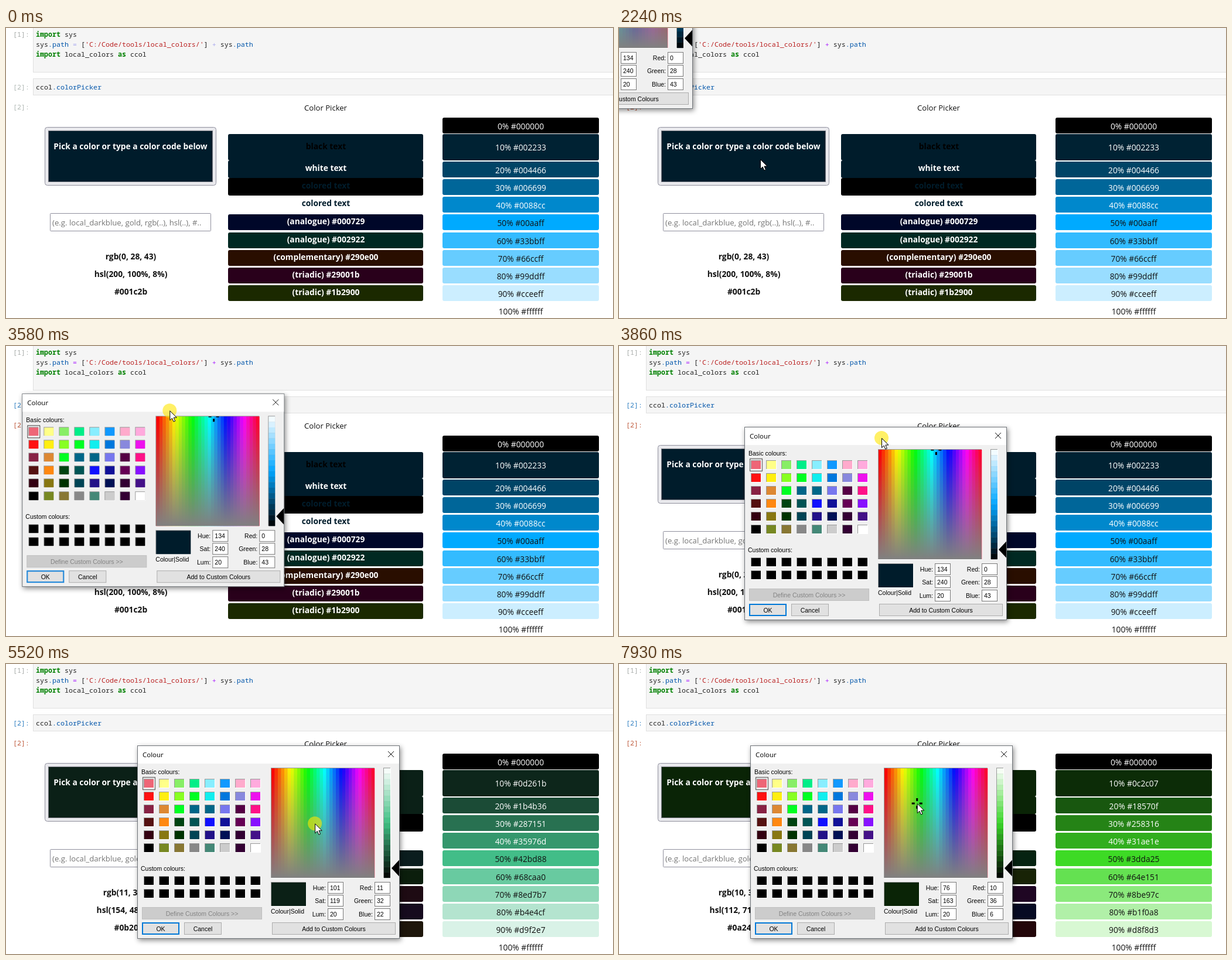
An HTML page that plays this animation: 1036x495 px, repeating every 8 s.

```html
<!DOCTYPE html>
<html lang="en">
<head>
<meta charset="utf-8">
<title>Color Picker</title>
<style>
  html, body { margin: 0; width: 100%; height: 100%; overflow: hidden; background: #fff; }
  svg { display: block; width: 100%; height: 100%; }
  text { white-space: pre; font: 13.8px "Open Sans", "Noto Sans", sans-serif; fill: #111; }
  .mid { text-anchor: middle; }
  .bold { font-weight: 700; }
  .code { font: 11.67px "Noto Sans Mono", "DejaVu Sans Mono", monospace; fill: #212121; }
  .kw { font-weight: 700; fill: #008000; }
  .prop { fill: #0055aa; }
  .str { fill: #ba2121; }
  .ui { font: 10.5px "Liberation Sans", Arial, sans-serif; fill: #000; }
  .end { text-anchor: end; }
  .white { fill: #fff; }
  #dialog { filter: drop-shadow(2px 3px 4px rgba(0, 0, 0, .45)); }
</style>
</head>
<body>
<svg id="stage" viewBox="0 0 1036 495"></svg>
<script>
const LOOP = 8000, STEP = 200 / 3;
const PRESS = 1790, PICK = 4800, RELEASE = 7930;
const $ = id => document.getElementById(id);

// ---- colour maths ----
const hex = rgb => '#' + rgb.map(v => v.toString(16).padStart(2, '0')).join('');

function hslHex(h, s, l) {
  s /= 100; l /= 100;
  const a = s * Math.min(l, 1 - l);
  return hex([0, 8, 4].map(n => {
    const k = (n + h / 30 + 12) % 12;
    return Math.round(255 * (l - a * Math.max(-1, Math.min(k - 3, 9 - k, 1))));
  }));
}

function toHsl([r, g, b]) {
  const max = Math.max(r, g, b), min = Math.min(r, g, b), d = max - min, sum = max + min;
  let h = 0;
  if (d) h = max === r ? (g - b) / d : max === g ? 2 + (b - r) / d : 4 + (r - g) / d;
  const s = d ? d / (sum > 255 ? 510 - sum : sum) : 0;
  return [(h * 60 + 360) % 360, s * 100, sum / 5.1].map(v => Math.floor(v + 1e-9));
}

// Integer hue/sat/lum on a 0..240 scale, as the system dialog computes it.
function dialogRgb(h, s, l) {
  const hi = l <= 120 ? Math.floor((l * (240 + s) + 120) / 240)
                      : l + s - Math.floor((l * s + 120) / 240);
  const lo = 2 * l - hi;
  return [80, 0, -80].map(o => {
    const k = (h + o + 240) % 240;
    const ramp = n => lo + Math.floor(((hi - lo) * n + 20) / 40);
    const v = k < 40 ? ramp(k) : k < 120 ? hi : k < 160 ? ramp(160 - k) : lo;
    return Math.max(0, Math.min(255, Math.floor((v * 255 + 120) / 240)));
  });
}

// ---- markup helpers ----
const rect = (x, y, w, h, fill, more = '') =>
  `<rect x="${x}" y="${y}" width="${w}" height="${h}" fill="${fill}" ${more}/>`;
const box = (x, y, w, h, fill, line, more = '') =>
  rect(x + .5, y + .5, w - 1, h - 1, fill, `stroke="${line}" ${more}`);
const text = (x, y, s, cls = '', more = '') =>
  `<text x="${x}" y="${y}" class="${cls}" ${more}>${s}</text>`;
const code = (y, ...parts) => text(51, y, parts.map(([s, c = '']) =>
  `<tspan class="${c}">${s}</tspan>`).join(''), 'code');
const list = (n, fn) => Array.from({ length: n }, (_, i) => fn(i)).join('');

// ---- notebook page ----
const rowY = i => i < 2 ? 153 + i * 28 : Math.round(228 + (i - 2) * 30.15);
const SCHEMES = [['analogue', 30], ['analogue', -30], ['complementary', 180], ['triadic', 120], ['triadic', -120]];

function page() {
  const round = 'rx="3"';
  return box(46, -10, 1000, 86, '#f5f5f5', '#e0e0e0') + box(46, 86, 1000, 29, '#f5f5f5', '#e0e0e0')
    + text(12, 15, '[1]:', 'code', 'style="fill:#a6aaa8"')
    + text(12, 105, '[2]:', 'code', 'id="inMark"') + text(12, 139, '[2]:', 'code', 'id="outMark"')
    + code(15, ['import', 'kw'], [' sys'])
    + code(32, ['sys'], ['.path', 'prop'], [' = ', 'op'], ['['], ["'C:/Code/tools/local_colors/'", 'str'],
        [']'], [' + ', 'op'], ['sys'], ['.path', 'prop'])
    + code(49, ['import', 'kw'], [' local_colors '], ['as', 'kw'], [' ccol'])
    + code(105, ['ccol'], ['.colorPicker', 'prop'])
    + text(545.5, 141, 'Color Picker', 'mid', 'style="font-size:13.1px"')
    + box(66, 169, 293, 100, '#e9e9ed', '#8f8f9d', 'rx="4" id="button"')
    + box(72, 175, 281, 88, '#000', '#777780', 'class="fill"')
    + text(212.5, 207, 'Pick a color or type a color code below', 'mid bold white')
    + box(75, 316, 275, 31, '#fff', '#8f8f9d', 'rx="1"')
    + text(79, 337, '(e.g. local_darkblue, gold, rgb(..), hsl(..), #..', '', 'style="font-size:13.2px;fill:#757575"')
    + ['rgb', 'hsl', 'hex'].map((id, i) => text(213, 395 + i * 30, '', 'mid bold', `id="${id}"`)).join('')
    + rect(379, 181, 333, 45, '', round + ' class="fill"') + rect(379, 226, 333, 30, '', round + ' class="fill"')
    + rect(379, 256, 333, 30, '#000', round)
    + text(546, 207, 'black text', 'mid bold', 'style="fill:#000"') + text(546, 244, 'white text', 'mid bold white')
    + text(546, 274, 'colored text', 'mid bold', 'data-ink') + text(546, 304, 'colored text', 'mid bold', 'data-ink')
    + list(5, i => rect(379, rowY(i + 5), 333, 27, '', `${round} id="scheme${i}"`)
        + text(546, rowY(i + 5) + 16.6, '', 'mid bold white', `id="schemeText${i}"`))
    + list(11, i => rect(745, rowY(i), 267, i === 1 ? 45 : 27, '', `${round} id="tone${i}"`)
        + text(878.5, rowY(i) + (i === 1 ? 28 : 20.3), '', i < 5 ? 'mid white' : 'mid', `id="toneText${i}"`));
}

// ---- colour dialog, drawn from its own top left corner ----
const BASIC = ('e67 ff8 8e6 0e8 8ef 19f fac fad f11 fe1 8f2 0f2 1ee 07d 88d e1e '
  + '824 d83 0f2 068 068 77e 504 f18 511 f81 041 055 11f 119 605 81f '
  + '301 871 030 045 218 015 303 418 000 782 873 888 487 ccc 303 fff').split(' ');
const FIELD = { x: 229, y: 39, w: 176, h: 187 };
const BANDS = 32, TONES = 20;
const fieldX = hue => FIELD.x + hue / 240 * FIELD.w;
const fieldY = sat => FIELD.y + (1 - sat / 240) * FIELD.h;

const sunken = (x, y, w, h, inner) => rect(x - 1, y - 1, w + 2, h + 2, '#fff')
  + rect(x - 1, y - 1, w + 1, h + 1, '#999') + inner;
const swatch = (i, y, c) => {
  const x = 12 + i % 8 * 26, top = y + Math.floor(i / 8) * 22;
  return sunken(x, top, 16, 14, rect(x, top, 16, 14, c));
};
const button = (x, y, w, label, fill = '#e1e1e1', line = '#adadad', ink = '#000') =>
  box(x, y, w, 21, fill, line) + text(x + w / 2, y + 14.5, label, 'ui mid', `style="fill:${ink}"`);
const entry = (x, y, label, id) => text(x - 3, y + 14, label + ':', 'ui end')
  + box(x, y, 27, 20, '#fff', '#7a7a7a') + text(x + 4, y + 14, '', 'ui', `id="${id}"`);

function dialog() {
  const { x, y, w, h } = FIELD, bw = w / BANDS, th = h / TONES;
  return `<defs>
      <linearGradient id="grey" x2="0" y2="1"><stop stop-color="#808080" stop-opacity="0"/>
        <stop offset="1" stop-color="#808080"/></linearGradient>
      <clipPath id="inField">${rect(x, y, w, h, '#000')}</clipPath></defs>`
    + box(0, 0, 448, 330, '#f0f0f0', '#70757a') + rect(1, 1, 446, 30, '#fff')
    + text(9, 20, 'Colour', '', 'style="font-size:11.5px;fill:#000"')
    + '<path d="M428 10l10 10m0-10l-10 10" stroke="#111" fill="none"/>'
    + text(7, 49, 'Basic colours:', 'ui') + text(6, 214, 'Custom colours:', 'ui')
    + BASIC.map((c, i) => swatch(i, 58, '#' + c)).join('')
    + box(9, 54, 22, 22, 'none', '#000', 'stroke-dasharray="1 1" stroke-width="1.4"')
    + list(16, i => swatch(i, 224, '#000'))
    + button(8, 276, 205, 'Define Custom Colours >>', '#ccc', '#bfbfbf', '#838383')
    + button(8, 302, 64, 'OK', '#e1e1e1', '#0078d7') + rect(9.5, 303.5, 61, 18, 'none', 'stroke="#0078d7"')
    + button(80, 302, 64, 'Cancel') + button(230, 302, 211, 'Add to Custom Colours')
    + sunken(x, y, w, h, list(BANDS, i =>
        rect(x + i * bw, y, bw + .3, h, `hsl(${i / BANDS * 360} 100% 50%)`)))
    + rect(x, y, w, h, 'url(#grey)')
    + '<g clip-path="url(#inField)"><path id="mark" d="M-9 0h5m8 0h5M0-9v5m0 8v5" stroke="#000" stroke-width="3"/></g>'
    + sunken(421, y, 11, h, list(TONES, i => rect(421, y + i * th, 11, th + .2, '', `id="lum${i}"`)))
    + '<path d="M434 209.5l13-14v28z"/>'
    + sunken(229, 234, 59, 40, rect(229, 234, 59, 40, '', 'id="sample"'))
    + text(228, 287, 'Colour|Solid', 'ui')
    + ['Hue', 'Sat', 'Lum'].map((s, i) => entry(325, Math.round(233 + i * 22.4), s, s)).join('')
    + ['Red', 'Green', 'Blue'].map((s, i) => entry(405, Math.round(233 + i * 22.4), s, s)).join('');
}

$('stage').innerHTML = page() + `<g id="dialog">${dialog()}</g>
  <g id="cursor"><circle id="halo" r="12" fill="#ffe600" opacity=".6"/>
  <path id="arrow" d="M.5 .5V16.5L4.2 13L6.8 19L9.4 17.9L6.9 12H12Z" fill="#fff" stroke="#000"/>
  <path id="beam" d="M-3-8h2.5l.5 .5l.5-.5H3M0-8V8M-3 8h6" fill="none" stroke="#000"/></g>`;

// ---- motion: smooth curves through [time, x, y] ----
function along(keys, t) {
  const last = keys.length - 1;
  if (t <= keys[0][0]) return keys[0].slice(1);
  if (t >= keys[last][0]) return keys[last].slice(1);
  const i = keys.findIndex(k => k[0] > t) - 1, a = keys[i], b = keys[i + 1];
  const span = b[0] - a[0], u = (t - a[0]) / span;
  const slope = (j, c) => j === 0 || j === last ? 0
    : (keys[j + 1][c] - keys[j - 1][c]) / (keys[j + 1][0] - keys[j - 1][0]);
  return [1, 2].map(c => a[c] + (b[c] - a[c]) * u * u * (3 - 2 * u)
    + span * u * (1 - u) * (slope(i, c) * (1 - u) - slope(i + 1, c) * u));
}

const APPROACH = [[450, 1000, 471], [850, 725, 352], [1250, 391, 237], [1650, 241, 224]];
const TO_FIELD = [[2250, 241, 224], [2450, 78, 60], [2517, 96, 72]];
const IN_FIELD = [[2517, 96, 73], [2650, 99, 73], [2783, 93, 73], [2917, 98, 73]];
const DRAG_CURSOR = [[3250, -88, -173], [3583, 279, 110], [3850, 448, 157], [3917, 455, 158]];
const DRAG_DIALOG = [[3250, -322, -192], [3583, 27, 81], [3850, 214, 138], [3917, 224, 139]];
const TO_PALETTE = [[4050, 455, 158], [4583, 557, 255]];
// hue and saturation while the button is held
const SCRUB = [[5050, 142, 141], [5317, 120, 140], [5450, 103, 121], [5517, 101, 119], [5917, 92, 85],
  [6250, 95, 62], [6517, 67, 50], [6583, 54, 44], [6850, 35, 52], [7183, 45, 110], [7517, 76, 163]];

function pointer(t) {
  if (t < 2240) return along(APPROACH, t);
  if (t < 2510) return along(TO_FIELD, t);
  if (t < 3100) return along(IN_FIELD, t);
  if (t < 4000) return along(DRAG_CURSOR, t);
  if (t < 4790) return along(TO_PALETTE, t);
  const [h, s] = along(SCRUB, t);
  return [224 + fieldX(h), 139 + fieldY(s)];
}

const show = (id, on) => $(id).setAttribute('visibility', on ? 'visible' : 'hidden');
const move = (id, [x, y]) => $(id).setAttribute('transform', `translate(${x.toFixed(1)} ${y.toFixed(1)})`);
const fill = (id, c) => $(id).setAttribute('fill', c);
const put = (id, s) => { $(id).textContent = s; };
const within = (t, a, b) => t >= a && t < b;

function paintPage(rgb) {
  const [h, s, l] = toHsl(rgb), c = hex(rgb);
  document.querySelectorAll('.fill').forEach(e => e.setAttribute('fill', c));
  document.querySelectorAll('[data-ink]').forEach(e => { e.style.fill = c; });
  put('rgb', `rgb(${rgb.join(', ')})`);
  put('hsl', `hsl(${h}, ${s}%, ${l}%)`);
  put('hex', c);
  SCHEMES.forEach(([name, turn], i) => {
    const tint = hslHex((h + turn + 360) % 360, s, l);
    fill('scheme' + i, tint);
    put('schemeText' + i, `(${name}) ${tint}`);
  });
  for (let i = 0; i <= 10; i++) {
    const tone = hslHex(h, s, i * 10);
    fill('tone' + i, tone);
    put('toneText' + i, `${i * 10}% ${tone}`);
  }
}

function paintDialog(h, s) {
  const rgb = dialogRgb(h, s, 20);
  fill('sample', hex(rgb));
  for (let i = 0; i < TONES; i++) fill('lum' + i, hex(dialogRgb(h, s, Math.round(240 * (1 - (i + .5) / TONES)))));
  [['Hue', h], ['Sat', s], ['Lum', 20], ['Red', rgb[0]], ['Green', rgb[1]], ['Blue', rgb[2]]]
    .forEach(([id, v]) => put(id, v));
}

let shown = '';
function draw(t) {
  const tick = 450 + Math.floor((t - 450) / STEP + .2) * STEP;
  const picked = when => t < PICK ? [134, 240] : along(SCRUB, when).map(Math.round);
  const now = picked(tick), before = picked(tick - STEP);   // the page trails the dialog by one step
  const key = now + '/' + before;
  if (key !== shown) {
    paintDialog(...now);
    paintPage(dialogRgb(...before, 20));
    shown = key;
  }

  const live = t >= PRESS;
  $('inMark').style.fill = live ? '#307fc1' : '#b0b8b4';
  $('outMark').style.fill = live ? '#bf5b3d' : '#b0b8b4';
  document.querySelectorAll('.op').forEach(e => { e.style.fill = live ? '#aa22ff' : '#a9a9ee'; });
  fill('button', within(t, 1400, PRESS) ? '#d0d0d7' : within(t, PRESS, 1920) ? '#b1b1b9' : '#e9e9ed');

  show('dialog', t >= 1855);
  $('dialog').setAttribute('opacity', Math.min(1, Math.max(0, (tick - 1783) / 200)).toFixed(2));
  move('dialog', along(DRAG_DIALOG, tick));
  show('mark', within(t, 1855, PICK) || t >= RELEASE);
  move('mark', [fieldX(now[0]), fieldY(now[1])]);

  const seen = within(t, 450, 3060) || t >= 3320, beam = within(t, 2510, 3060);
  const held = within(t, PRESS, 1920) || within(t, 2440, 2510) || within(t, 3320, 4055) || within(t, PICK, RELEASE);
  move('cursor', pointer(tick));
  show('arrow', seen && !beam);
  show('beam', beam);
  show('halo', held);
}

const start = performance.now();
function frame() {
  draw((performance.now() - start) % LOOP);
  requestAnimationFrame(frame);
}
frame();
</script>
</body>
</html>
```
